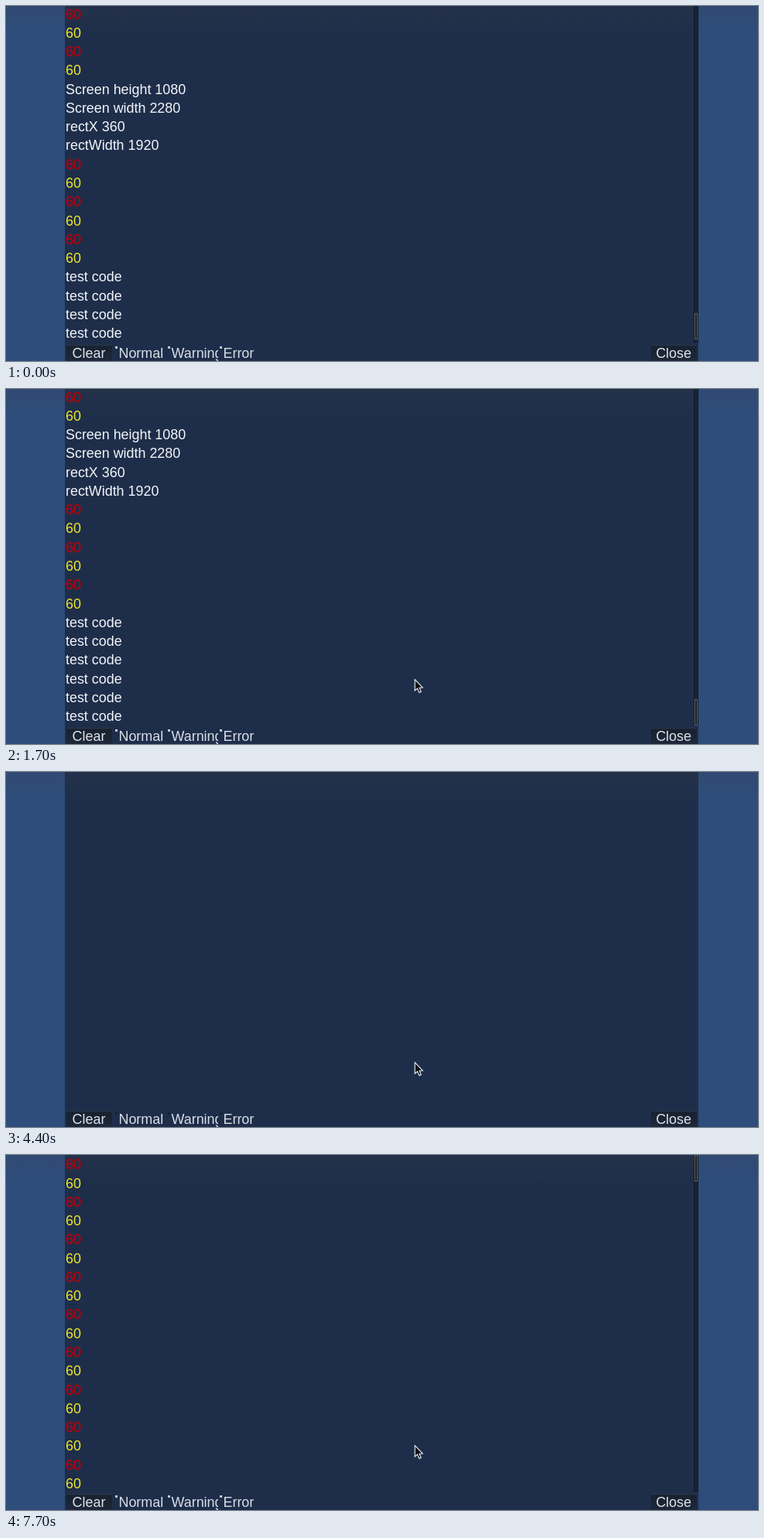
An HTML page with a canvas that plays this animation: 971 by 459 pixels, repeating every 8000 ms.

```html
<!DOCTYPE html>
<html lang="en">
<head>
<meta charset="utf-8">
<title>Log console</title>
<style>
html, body { margin: 0; width: 100%; height: 100%; overflow: hidden; background: #2e4d7b; }
canvas { display: block; }
</style>
</head>
<body>
<canvas id="stage" width="971" height="459"></canvas>
<script>
const ctx = document.getElementById('stage').getContext('2d');
const LOOP = 8000, TICK = 100;
const PANEL = { left: 76, right: 894 };
const ROWS = 18, PITCH = 24.27, VIEW = 435;
const FONT = '17.9px "Liberation Sans", Arial, sans-serif';
const COLORS = { normal: '#f3f5f9', warning: '#eee52c', error: '#a60614' };

// Full log: red/yellow counter pairs, a screen report, then more pairs and tests.
const counters = pairs => Array.from({ length: pairs * 2 }, (_, i) =>
  ({ text: '60', type: i % 2 ? 'warning' : 'error' }));
const notes = texts => texts.map(text => ({ text, type: 'normal' }));
const log = [
  ...counters(107),
  ...notes(['Screen height 1080', 'Screen width 2280', 'rectX 360', 'rectWidth 1920']),
  ...counters(3),
  ...notes(Array(6).fill('test code'))
];

// [start ms, visible types (n, w, e), lines above the end; null = top of list]
const steps = [
  [0, 'nwe', 2], [500, 'nwe', 4], [1000, 'nwe', 6],
  [1500, 'nwe', 2], [1700, 'nwe', 0], [1900, 'nwe', 2], [2000, 'nwe', 4],
  [2200, 'nwe', 6], [2300, 'nwe', 8], [2400, 'nwe', 10], [2700, 'nwe', 12],
  [3400, 'we', 2], [4300, 'e', 0], [4400, '', null],
  [5100, 'n', null], [6400, 'nw', null], [6900, 'nwe', null]
];

function fillGradient(x, y, w, h, stops) {
  const g = ctx.createLinearGradient(0, y, 0, y + h);
  stops.forEach(([at, color]) => g.addColorStop(at, color));
  ctx.fillStyle = g;
  ctx.fillRect(x, y, w, h);
}

function rect(x, y, w, h, color) {
  ctx.fillStyle = color;
  ctx.fillRect(x, y, w, h);
}

function label(text, x, y, color) {
  ctx.fillStyle = color;
  ctx.fillText(text, x, y);
}

function drawBackground() {
  fillGradient(0, 0, 971, 459, [[0, '#304a73'], [0.08, '#2e4d7b'], [1, '#2e4d7b']]);
  fillGradient(PANEL.left, 0, PANEL.right - PANEL.left, 459,
    [[0, '#243149'], [0.08, '#1e2e4a'], [1, '#1e2e4a']]);
}

function drawList(lines, up) {
  const atTop = up === null;
  const first = atTop ? 0 : Math.max(0, lines.length - ROWS - up);
  const base = atTop ? 18.3 : 16.6;
  lines.slice(first, first + ROWS).forEach(({ text, type }, row) => {
    const y = base + row * PITCH;
    label(text, 77, y, COLORS[type]);
    if (type === 'error') {
      ctx.strokeStyle = COLORS.error;
      ctx.lineWidth = 0.7;
      ctx.strokeText(text, 77, y);
    }
  });
  if (lines.length > ROWS) drawScrollbar(lines.length, first);
}

function drawScrollbar(count, first) {
  const size = VIEW * ROWS / count;
  const top = (VIEW - size) * first / (count - ROWS);
  rect(888, 0, 6, VIEW, '#111a28');
  rect(889, 0, 4, VIEW - 1, '#182335');
  rect(889, top, 4, size, '#66655c');
  rect(890, top + 1, 2, size - 2, '#1a1d22');
}

function drawButton(text, x, w) {
  fillGradient(x, 438, w, 21, [[0, '#2c3a50'], [0.1, '#18212f'], [1, '#1d283a']]);
  ctx.textAlign = 'center';
  label(text, x + w / 2 - 0.5, 455, '#dfe3ea');
  ctx.textAlign = 'left';
}

function drawToggle(text, x, on) {
  rect(x - 4, 440, 3, 3, on ? '#c3c9d2' : '#17202f');
  ctx.save();
  ctx.beginPath();
  ctx.rect(x, 436, 61, 23);
  ctx.clip();
  label(text, x + 0.5, 455, '#d9dee7');
  ctx.restore();
}

function drawCursor(x, y) {
  ctx.save();
  ctx.translate(x, y);
  ctx.beginPath();
  [[0, 0], [0, 14.5], [3.2, 11.6], [5.6, 17], [8, 16], [5.8, 10.8], [10, 10.5]]
    .forEach(([px, py]) => ctx.lineTo(px, py));
  ctx.closePath();
  ctx.fillStyle = '#0c0f14';
  ctx.fill();
  ctx.strokeStyle = '#f2f4f7';
  ctx.lineWidth = 1.1;
  ctx.stroke();
  ctx.restore();
}

function draw(time) {
  const [, visible, up] = steps.findLast(([start]) => start <= time);
  const lines = log.filter(line => visible.includes(line.type[0]));
  ctx.font = FONT;
  drawBackground();
  drawList(lines, up);
  drawButton('Clear', 78, 59);
  drawButton('Close', 833, 59);
  drawToggle('Normal', 145, visible.includes('n'));
  drawToggle('Warning', 213, visible.includes('w'));
  drawToggle('Error', 280, visible.includes('e'));
  // The pointer glides in from below the stage, then rests.
  const rest = (1 - Math.min(1, time / 900)) ** 2;
  drawCursor(528 + 40 * rest, 375.5 + 90 * rest);
}

function frame() {
  const time = performance.now() % LOOP;
  draw(Math.floor(time / TICK) * TICK);
  requestAnimationFrame(frame);
}
frame();
</script>
</body>
</html>
```
